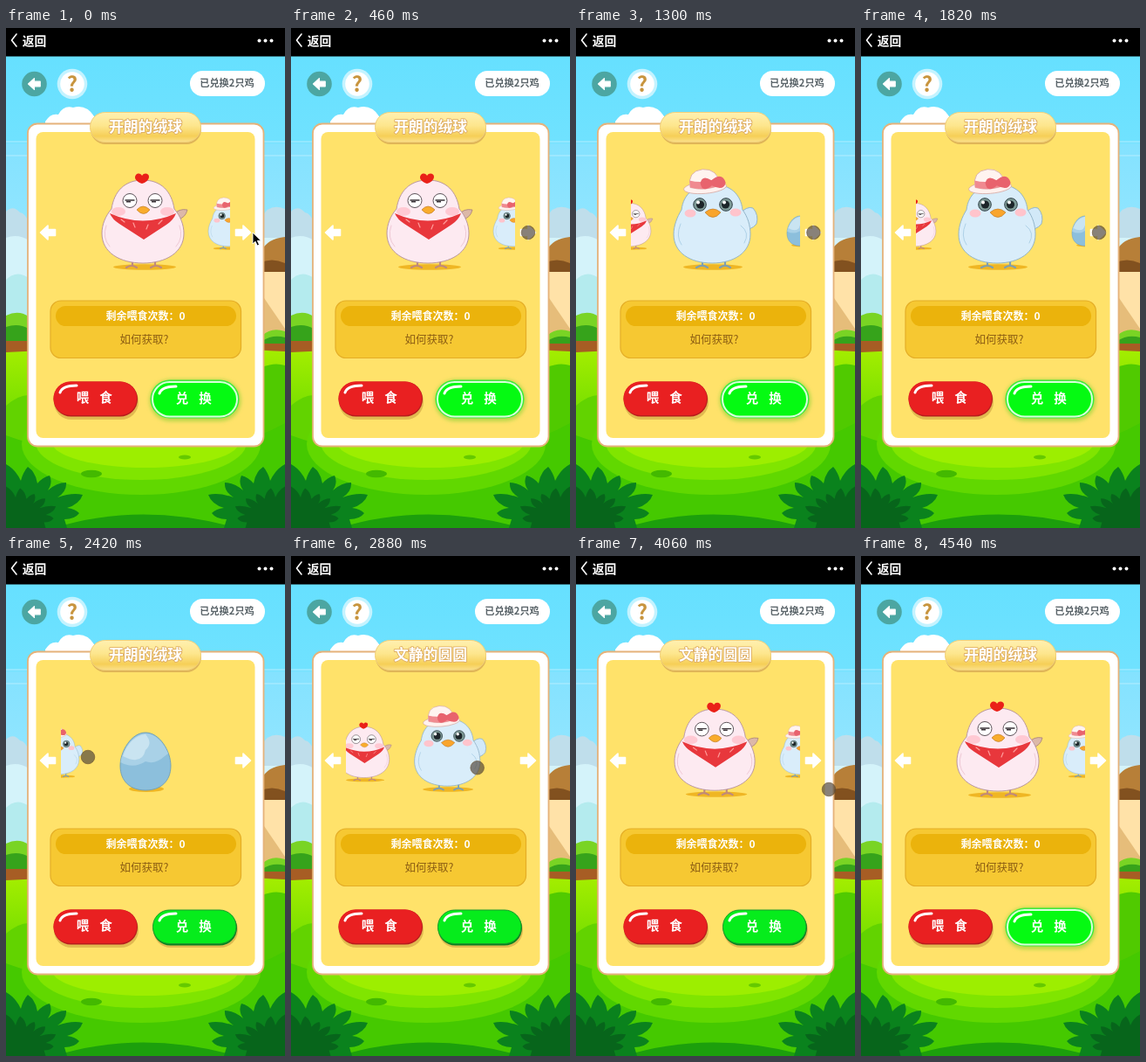
Write an HTML page that moves like this. It is 320 by 572 pixels and loops after 4.56 s.

```html
<!DOCTYPE html>
<html lang="zh">
<head>
<meta charset="utf-8">
<title>Chick carousel</title>
<style>
html, body { margin: 0; width: 100%; height: 100%; overflow: hidden; background: #6be2ff; }
svg { display: block; width: 100%; height: 100%; }
text { font-family: "Noto Sans CJK SC", "Noto Sans", sans-serif; text-anchor: middle; }
.bold { font-weight: 700; fill: #fff; }
.title { font-size: 16.8px; paint-order: stroke; stroke: #dfae63; stroke-width: 1.8px; stroke-linejoin: round; }
.btn { font-size: 14.5px; }
.line { fill: none; stroke-linecap: round; stroke-linejoin: round; }
</style>
</head>
<body>
<svg viewBox="0 0 320 572" preserveAspectRatio="none">
  <defs>
    <linearGradient id="sky" x2="0" y2="1">
      <stop offset="0" stop-color="#66e0ff"/><stop offset=".28" stop-color="#70e2ff"/>
      <stop offset=".29" stop-color="#84e2ff"/><stop offset="1" stop-color="#a5ebff"/>
    </linearGradient>
    <linearGradient id="grass" x2="0" y2="1">
      <stop offset="0" stop-color="#a5ee00"/><stop offset=".35" stop-color="#78df00"/>
      <stop offset="1" stop-color="#2fb908"/>
    </linearGradient>
    <linearGradient id="gold" x2="0" y2="1">
      <stop offset="0" stop-color="#fff0b0"/><stop offset=".45" stop-color="#fde68d"/>
      <stop offset=".8" stop-color="#f6cf57"/><stop offset="1" stop-color="#fbe08a"/>
    </linearGradient>
    <clipPath id="window"><rect x="63" y="140" width="194" height="160"/></clipPath>
    <filter id="soft" x="-20%" y="-40%" width="140%" height="180%"><feGaussianBlur stdDeviation="2"/></filter>
    <g id="arrow">
      <path d="M39.5 234L48 226V230.5H56.5V237.5H48V242Z" fill="#fff" stroke="#fff" stroke-width="1.6" stroke-linejoin="round"/>
    </g>
    <path id="shine" d="M62 417C64 411 70 409 81 409" class="line" stroke="#fff" stroke-width="3"/>
    <path id="leaf" d="M0 572V499Q11 505 17 518Q20 507 25 502Q34 508 36 521Q42 514 50 512Q54 520 48 529Q58 520 69 520Q70 530 59 537Q76 531 88 534Q84 545 70 549Q79 550 84 555Q79 562 67 562L70 572Z"/>
  </defs>

  <!-- landscape -->
  <rect y="32" width="320" height="350" fill="url(#sky)"/>
  <path d="M0 130H26M294 130H320M0 146H26M294 146H320" stroke="#b4edff"/>
  <path d="M45 118V107Q51 97 60 99Q66 88 77 91Q92 87 101 101V118Z" fill="#fff"/>
  <path d="M0 210Q8 202 16 211Q22 212 26 222V250H0ZM294 216Q302 200 320 207V250H294Z" fill="#bfdeeb"/>
  <path d="M0 240Q14 235 26 243V340H0ZM294 240H320V340H294Z" fill="#d4f3fa"/>
  <path d="M0 288Q12 276 26 286V340H0Z" fill="#b4ebee"/>
  <path d="M294 275H320V348L294 358Z" fill="#ffe2a8"/>
  <path d="M294 306L320 344V350L294 360Z" fill="#e6bd7a"/>
  <path d="M290 262Q296 241 320 239V278H290Z" fill="#b77f38"/>
  <path d="M290 269Q305 262 320 269V279H290Z" fill="#82511f"/>
  <path d="M0 329Q14 322 26 330V364H0ZM294 352Q304 342 320 347V368H294Z" fill="#79d424"/>
  <path d="M0 342Q14 337 26 344V364H0ZM294 358Q306 350 320 354V368H294Z" fill="#36a31b"/>
  <path d="M0 358H26V371H0ZM294 361H320V371H294Z" fill="#a75d24"/>
  <path d="M0 371Q160 362 320 370V572H0Z" fill="url(#grass)"/>
  <path d="M0 432Q14 420 26 420V500H0Z" fill="#62d300"/>
  <path d="M294 388Q308 382 320 386V500H294Z" fill="#50ca00"/>
  <path d="M0 466Q70 492 160 488Q260 486 320 452V572H0Z" fill="#45c900"/>
  <ellipse cx="155" cy="476" rx="137" ry="58" fill="#61d800"/>
  <ellipse cx="155" cy="474" rx="121" ry="43" fill="#80e500"/>
  <ellipse cx="160" cy="474" rx="107" ry="29" fill="#9dee00"/>
  <path d="M55 572Q155 541 265 572Z" fill="#1c9f0c"/>
  <ellipse cx="98" cy="510" rx="12" ry="4.2" fill="#43b900"/>
  <ellipse cx="205" cy="491" rx="7" ry="2.5" fill="#65c900"/>
  <g fill="#0a821d">
    <use href="#leaf"/><use href="#leaf" transform="matrix(-1 0 0 1 320 0)"/>
  </g>
  <g fill="#07651b">
    <use href="#leaf" transform="matrix(.65 0 0 .65 0 200.2)"/>
    <use href="#leaf" transform="matrix(-.65 0 0 .65 320 200.2)"/>
  </g>

  <!-- top bar -->
  <rect width="320" height="32.5"/>
  <path d="M12 7L6.5 14 12 21" class="line" stroke="#fff" stroke-width="1.6"/>
  <text class="bold" x="32.5" y="19.5" font-size="13.8">返回</text>
  <g fill="#fff"><circle cx="290.5" cy="14.5" r="2"/><circle cx="297.5" cy="14.5" r="2"/><circle cx="304.5" cy="14.5" r="2"/></g>
  <circle cx="32.5" cy="64" r="14.3" fill="#4ca6a2"/>
  <use href="#arrow" transform="translate(-6 -123.2) scale(.8)"/>
  <circle cx="76" cy="64" r="17.3" fill="#c4f3ff"/>
  <circle cx="76" cy="64" r="13.8" fill="#fff"/>
  <text x="76" y="72.5" font-size="24" font-weight="900" fill="#c8953f">?</text>
  <rect x="211" y="49" width="86" height="29" rx="14.5" fill="#fff"/>
  <text x="253.5" y="67.3" font-size="11.2" font-weight="700" fill="#5a6469">已兑换2只鸡</text>

  <!-- card -->
  <rect x="25" y="109.5" width="270.5" height="369" rx="11" fill="#fff" stroke="#e5b27a" stroke-width="1.8"/>
  <rect x="34.5" y="119" width="251" height="350" rx="8" fill="#ffe26a"/>
  <rect x="97" y="99" width="127" height="34" rx="17" fill="#dfb558"/>
  <rect x="96.5" y="96.5" width="127" height="34" rx="17" fill="url(#gold)" stroke="#f1d07a"/>
  <text id="title" class="bold title" x="160" y="118.5"></text>

  <g clip-path="url(#window)">
    <g class="item">
      <ellipse cx="159" cy="273.5" rx="36" ry="3.2" fill="#efb624"/>
      <path d="M145 266V272M171 266V272M138 274Q144 270 150 274M166 274Q172 270 178 274" class="line" stroke="#c08a7a" stroke-width="2.2"/>
      <path d="M192 214Q198 206 208 208Q206 217 197 219Z" fill="#dcb8a8" stroke="#a88077" stroke-width=".8"/>
      <path d="M157 174C178 174 190 187 193 207C200 215 204 225 204 235C204 257 183 269 157 269C131 269 110 257 110 235C110 225 114 215 121 207C124 187 136 174 157 174Z" fill="#fdeaf1" stroke="#b48f9c" stroke-width=".9"/>
      <path d="M115 226Q110 240 119 250M199 226Q204 240 195 250" class="line" stroke="#efc9d5"/>
      <path d="M156 178C150 176 146 172 149 168C152 165 155 167 156 169C158 165 164 166 164 170C164 174 160 177 156 178Z" fill="#ea2018"/>
      <g fill="#ffc9d3"><ellipse cx="129" cy="210" rx="8" ry="5"/><ellipse cx="185" cy="210" rx="8" ry="5"/></g>
      <g fill="#fff" stroke="#5b5158"><circle cx="142" cy="197.5" r="8"/><circle cx="171" cy="197.5" r="8"/></g>
      <path d="M137 197H147M166 197H176" class="line" stroke="#3a3338" stroke-width="1.4"/>
      <path d="M138 198H143V199.5H138ZM167 198H172V199.5H167Z" fill="#3a3338"/>
      <path d="M119 212Q157 229 195 212Q192 220 184 225L158 242L130 224Q122 219 119 212Z" fill="#e8373c"/>
      <path d="M132 219L136 222M146 223L148 228M163 225L161 230M179 220L175 224" class="line" stroke="#ff9c9a" stroke-width="1.2"/>
      <path d="M150 208Q157 200 165 208Q158 217 150 208Z" fill="#f9ac2c" stroke="#b7762a" stroke-width=".6"/>
    </g>
    <g class="item">
      <ellipse cx="157" cy="273.5" rx="34" ry="3.2" fill="#efb624"/>
      <path d="M145 266V272M171 266V272M138 274Q145 270 151 274M165 274Q171 270 177 274" class="line" stroke="#7f9fae" stroke-width="2.2"/>
      <path d="M186 214Q196 203 203 206Q210 214 207 224Q201 232 190 230Z" fill="#d2e9f8" stroke="#8cafc6" stroke-width=".9"/>
      <path d="M157 179C177 179 189 190 191 208C197 216 200 226 200 236C200 257 181 269 156 269C131 269 112 257 112 236C112 226 116 216 121 208C123 190 136 179 157 179Z" fill="#d9edfa" stroke="#8cafc6" stroke-width=".9"/>
      <path d="M120 224Q114 238 121 248M189 226Q200 234 193 246" class="line" stroke="#aed1e7"/>
      <g fill="#ffc4cc"><ellipse cx="131" cy="212" rx="6.5" ry="4.5"/><ellipse cx="183" cy="211" rx="6.5" ry="4.5"/></g>
      <g fill="#7f9c98" stroke="#33424a"><circle cx="142" cy="202" r="7.3"/><circle cx="172" cy="202" r="7.3"/></g>
      <g fill="#1c2529"><circle cx="142.5" cy="202" r="4.6"/><circle cx="171.5" cy="202" r="4.6"/></g>
      <g fill="#fff"><circle cx="140" cy="199.5" r="2"/><circle cx="170" cy="199.5" r="2"/></g>
      <path d="M148 211Q157 203 166 211Q157 222 148 211Z" fill="#f9a52c" stroke="#b87324" stroke-width=".6"/>
      <g transform="rotate(-5 148 182)">
        <ellipse cx="148" cy="182.5" rx="24.5" ry="6.8" fill="#fff1ee" stroke="#d6a9a2" stroke-width=".8"/>
        <path d="M131 181Q129 162 147 161.500Q164 162 166 181Q148 187 131 181Z" fill="#fff4f0" stroke="#d6a9a2" stroke-width=".8"/>
        <path d="M131 173Q148 179 165 172L166 181Q148 187 131 181Z" fill="#f08a90"/>
        <path d="M156 175Q146 167 143 177Q144 189 156 181Q169 189 172 179Q169 166 156 175Z" fill="#e8636d"/>
      </g>
    </g>
    <g class="item">
      <ellipse cx="161" cy="266.5" rx="20" ry="3.5" fill="#efb624"/>
      <path d="M160 202C176 202 189 223 189 240C189 258 177 268 160 268C143 268 131 258 131 240C131 223 144 202 160 202Z" fill="#8cbfdc" stroke="#6e9db8" stroke-width=".9"/>
      <path d="M131.500 236Q146 244 160 235Q171 239 182 229L186 226C181 213 171 203 160 203C146 203 134 220 131.500 236Z" fill="#a9d1e7"/>
      <path d="M134 229Q142 206 160 204Q169 214 160 222Q156 240 134 229Z" fill="#c9e4f1"/>
    </g>
  </g>
  <use href="#arrow"/><use href="#arrow" transform="matrix(-1 0 0 1 320 0)"/>

  <!-- feed panel -->
  <rect x="51" y="312" width="218.5" height="65.5" rx="12" fill="#f6c832" stroke="#e4ad26" stroke-width="1.2"/>
  <rect x="57" y="318" width="207" height="23" rx="11.5" fill="#ebb30c"/>
  <text class="bold" x="160" y="334" font-size="12">剩余喂食次数：0</text>
  <text x="158.5" y="361" font-size="12.5" fill="#8b5d13">如何获取?</text>

  <rect x="55" y="407" width="97" height="41" rx="20" fill="#c99a3c" opacity=".55"/>
  <rect x="54.5" y="404.5" width="96.5" height="40" rx="20" fill="#b91c1c"/>
  <rect x="54.500" y="404.500" width="95.5" height="38.5" rx="19.2" fill="#e92021"/>
  <use href="#shine"/>
  <g id="plain">
    <rect x="169" y="408" width="97" height="40" rx="20" fill="#c99a3c" opacity=".55"/>
    <rect x="168.5" y="405.5" width="96.5" height="40" rx="20" fill="#087f20"/>
    <rect x="168.5" y="405" width="95.5" height="38.5" rx="19" fill="#06ec1c" stroke="#1a9b2c"/>
    <use href="#shine" x="114"/>
  </g>
  <g id="glow">
    <rect x="164.5" y="402" width="105" height="48" rx="24" fill="#b9d84a" filter="url(#soft)"/>
    <rect x="165.5" y="402.5" width="102" height="44" rx="22" fill="#3dea3c"/>
    <rect x="168" y="405" width="97" height="39.5" rx="19.7" fill="#05fa12" stroke="#d9ffdc" stroke-width="2"/>
    <use href="#shine" x="114" y="1"/>
  </g>
  <g class="bold btn">
    <text x="88" y="428">喂</text><text x="114.5" y="428">食</text>
    <text x="202" y="428.5">兑</text><text x="228.5" y="428.5">换</text>
  </g>

  <path id="pointer" d="M0 0V13L3 10.2 5.2 15 7.5 14 5.3 9.3H9.5Z" stroke="#fff" stroke-width=".9"/>
  <circle id="touch" r="7.8" fill="#50463a" fill-opacity=".68" stroke="#6b5330" stroke-opacity=".6"/>
</svg>
<script>
const LOOP = 4560, GAP = 97, CENTER = 160, MID_Y = 229;
const GRAB = 2440, RELEASE = 4150;
const el = id => document.getElementById(id);
const items = [...document.querySelectorAll('.item')];
const titles = ['开朗的绒球', '文静的圆圆'];

// time, x, y of the finger
const path = [
  [0, 283, 234], [240, 272, 234], [900, 272, 234], [1820, 273, 234], [1960, 273, 234],
  [2400, 94, 230], [GRAB, 94, 230], [3260, 309, 252], [4060, 290, 267], [LOOP, 290, 267]
];

const ramp = (t, a, b) => Math.min(1, Math.max(0, (t - a) / (b - a)));
const smooth = u => u * u * (3 - 2 * u);
const easeOut = u => 1 - (1 - u) ** 3;
const show = (node, on) => node.setAttribute('visibility', on ? 'visible' : 'hidden');

function finger(t) {
  const i = path.findIndex(k => k[0] > t);
  const [t0, x0, y0] = path[i - 1], [t1, x1, y1] = path[i];
  const u = smooth(ramp(t, t0, t1));
  return [x0 + (x1 - x0) * u, y0 + (y1 - y0) * u];
}

// horizontal scroll of the carousel in pixels
function scroll(t, x) {
  if (t < GRAB) return GAP * (easeOut(ramp(t, 960, 1320)) + easeOut(ramp(t, 1860, 2220)));
  const dragged = 2 * GAP - (x - 94);
  return dragged * (1 - easeOut(ramp(t, RELEASE, RELEASE + 200)));
}

function draw(t) {
  const [x, y] = finger(t);
  const offset = scroll(t, x);
  items.forEach((item, i) => {
    const d = i * GAP - offset;
    const s = 1 - .48 * Math.min(1, Math.abs(d) / GAP) ** .82;
    item.setAttribute('transform',
      `translate(${CENTER + d} ${MID_Y}) scale(${s}) translate(${-CENTER} ${-MID_Y})`);
  });
  el('title').textContent = titles[+(t >= 2500 && t < 4360)];
  const glowing = t < 2300 || t >= 4360;
  show(el('glow'), glowing);
  show(el('plain'), !glowing);
  show(el('pointer'), t < 160);
  show(el('touch'), t >= 160 && t < 4260);
  for (const id of ['pointer', 'touch']) el(id).setAttribute('transform', `translate(${x} ${y})`);
}

const start = performance.now();
function tick() {
  draw((performance.now() - start) % LOOP);
  requestAnimationFrame(tick);
}
tick();
</script>
</body>
</html>
```
